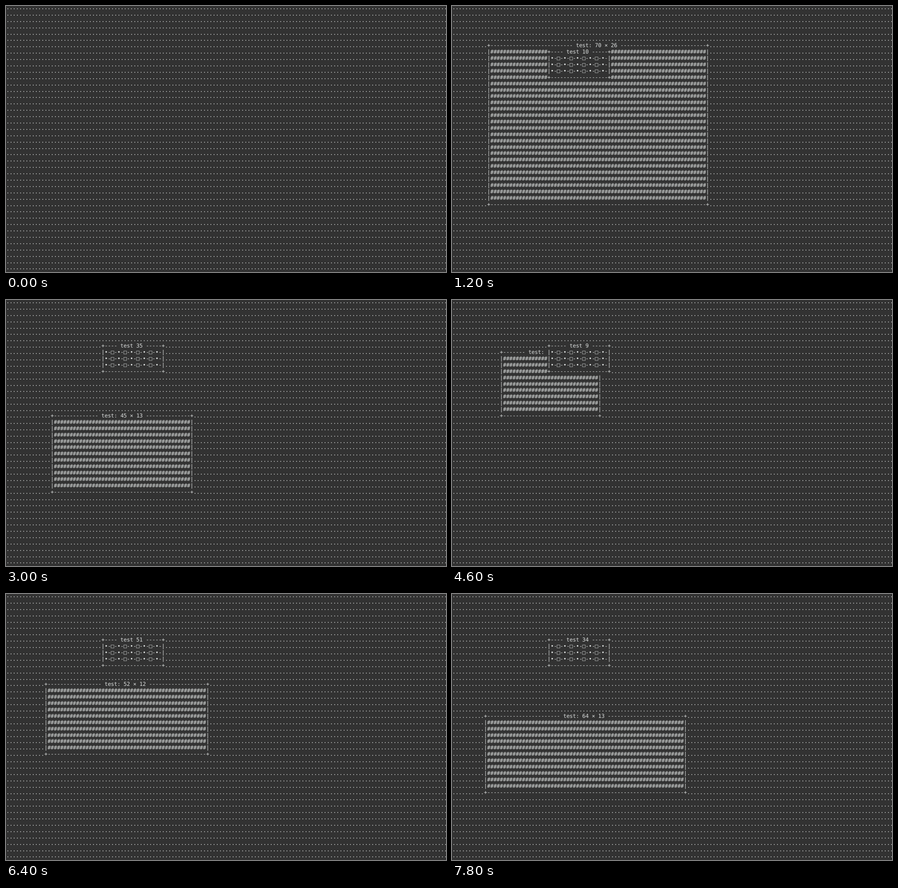
An HTML page without scripts that plays this animation: 962x582 px, repeating every 8 s.

```html
<!DOCTYPE html>
<html lang="en">
<head>
<meta charset="utf-8">
<title>Text windows</title>
<style>
/* Whole character cells: integers round while they are interpolated */
@property --on { syntax: "<integer>"; inherits: true; initial-value: 0; }
@property --named { syntax: "<integer>"; inherits: true; initial-value: 0; }
@property --l { syntax: "<integer>"; inherits: true; initial-value: 10; }
@property --t { syntax: "<integer>"; inherits: true; initial-value: 3; }
@property --r { syntax: "<integer>"; inherits: true; initial-value: 88; }
@property --b { syntax: "<integer>"; inherits: true; initial-value: 32; }
@property --w { syntax: "<integer>"; inherits: true; initial-value: 1; }
@property --h { syntax: "<integer>"; inherits: true; initial-value: 1; }
@property --n { syntax: "<integer>"; inherits: true; initial-value: 1; }
@property --pad { syntax: "<integer>"; inherits: false; initial-value: 0; }

html, body {
  margin: 0;
  width: 100%;
  height: 100%;
  overflow: hidden;
  background: #323232;
}
body { position: relative; }

.grid {
  --cw: 7px;
  --ch: 14px;

  /* long runs built from short strings */
  --dot: "...................................";
  --dots: var(--dot) var(--dot) var(--dot) var(--dot) "\A";
  --dots7: var(--dots) var(--dots) var(--dots) var(--dots) var(--dots) var(--dots) var(--dots);
  --hash: "########################################";
  --hashes: var(--hash) var(--hash) "\A";
  --hashes8: var(--hashes) var(--hashes) var(--hashes) var(--hashes) var(--hashes) var(--hashes) var(--hashes) var(--hashes);
  --dash: "----------------------------------------";
  --pipes: "|\A|\A|\A|\A|\A|\A|\A|\A";

  position: absolute;
  left: 0;
  top: 0;
  width: 980px;
  height: 588px;
  /* the hair of rotation keeps baselines from snapping to whole pixels */
  transform: translate(.45px, -3.96px) rotate(.001deg) scale(.9909, .9921);
  transform-origin: 0 0;
  font: 12px/14px "DejaVu Sans Mono", monospace;
  letter-spacing: calc(7px - .60205em);
  text-rendering: geometricPrecision;
  white-space: pre;
  color: #dcdfde;
  animation: 8s steps(1) -4ms infinite;
  animation-name: show, rename, left, top, right, bottom, count;
}

.dots::before {
  content: var(--dots7) var(--dots7) var(--dots7) var(--dots7) var(--dots7) var(--dots7);
}

.win {
  position: absolute;
  left: calc(var(--l) * var(--cw));
  top: calc(var(--t) * var(--ch));
  width: calc(var(--w) * var(--cw));
  height: calc(var(--h) * var(--ch));
  background: #323232;
  opacity: var(--on);
}
.big {
  --w: calc(var(--r) - var(--l) + 1);
  --h: calc(var(--b) - var(--t) + 1);
}
.small { --l: 30; --t: 7; --w: 20; --h: 5; }

/* Each strip is: cap, stretching middle, cap */
.strip {
  position: absolute;
  left: 0;
  right: 0;
  display: flex;
  overflow: hidden;
}
.strip span { flex: 1; min-width: 0; overflow: hidden; }
.edge { height: var(--ch); }
.edge::before, .edge::after { content: "+"; }
.edge span::before { content: var(--dash) var(--dash); }
.low { bottom: 0; }
.body { top: var(--ch); bottom: var(--ch); }
.body::before, .body::after { content: var(--pipes) var(--pipes) var(--pipes) var(--pipes); }
.hashes::before { content: var(--hashes8) var(--hashes8) var(--hashes8) var(--hashes8); }

.title {
  --pad: calc((var(--w) - 2 - var(--len)) / 2 - .25);
  position: absolute;
  top: 0;
  left: calc((var(--pad) + 1) * var(--cw));
  height: var(--ch);
  background: #323232;
}
.name { --len: 6; opacity: var(--named); }
.size { --len: 15; opacity: calc(1 - var(--named)); }
.size::before {
  counter-reset: w var(--w) h var(--h);
  content: " test: " counter(w) " × " counter(h) " ";
}
.tally { left: auto; right: calc(6 * var(--cw)); }
.tally::before {
  counter-reset: n var(--n);
  content: " test " counter(n) " ";
}

@keyframes show {
  0% { --on: 0; }
  2.5%, 100% { --on: 1; }
}
@keyframes rename {
  0% { --named: 1; }
  5%, 100% { --named: 0; }
}
@keyframes left {
  0% { --l: 10; }
  2.5% { --l: 10; animation-timing-function: steps(5); }
  15% { --l: 11; animation-timing-function: steps(6); }
  30% { --l: 13; animation-timing-function: steps(5); }
  42.5% { --l: 15; }
  45% { --l: 16; }
  55% { --l: 15; }
  65% { --l: 15; animation-timing-function: steps(6); }
  80% { --l: 12; animation-timing-function: steps(5); }
  92.5% { --l: 9; }
  97.5%, 100% { --l: 10; }
}
@keyframes top {
  0% { --t: 3; }
  2.5% { --t: 3; animation-timing-function: steps(5); }
  15% { --t: 6; animation-timing-function: steps(3); }
  22.5% { --t: 10; animation-timing-function: steps(8); }
  42.5% { --t: 20; animation-timing-function: steps(2); }
  47.5% { --t: 22; }
  50% { --t: 22; animation-timing-function: steps(4); }
  60% { --t: 3; }
  62.5% { --t: 1; }
  65% { --t: 5; animation-timing-function: steps(6); }
  80% { --t: 14; animation-timing-function: steps(2); }
  85% { --t: 16; animation-timing-function: steps(3); }
  92.5% { --t: 20; }
  97.5%, 100% { --t: 19; }
}
@keyframes right {
  0% { --r: 88; }
  2.5% { --r: 88; animation-timing-function: steps(5); }
  15% { --r: 80; animation-timing-function: steps(3); }
  22.5% { --r: 74; animation-timing-function: steps(3); }
  30% { --r: 67; animation-timing-function: steps(5); }
  42.5% { --r: 52; }
  45% { --r: 51; }
  47.5% { --r: 46; }
  65% { --r: 46; animation-timing-function: steps(6); }
  80% { --r: 63; animation-timing-function: steps(2); }
  85% { --r: 67; animation-timing-function: steps(3); }
  92.5% { --r: 75; }
  95% { --r: 74; }
  97.5%, 100% { --r: 73; }
}
@keyframes bottom {
  0% { --b: 32; }
  2.5% { --b: 32; animation-timing-function: steps(5); }
  15% { --b: 31; }
  30% { --b: 31; animation-timing-function: steps(5); }
  42.5% { --b: 30; }
  50% { --b: 30; animation-timing-function: steps(4); }
  60% { --b: 14; }
  62.5% { --b: 12; }
  65% { --b: 16; animation-timing-function: steps(6); }
  80% { --b: 25; animation-timing-function: steps(2); }
  85% { --b: 27; animation-timing-function: steps(3); }
  92.5% { --b: 32; }
  97.5%, 100% { --b: 31; }
}
/* counts up and wraps at sixty */
@keyframes count {
  0% { --n: 1; }
  2.5% { --n: 1; animation-timing-function: steps(8); }
  22.5% { --n: 16; animation-timing-function: steps(8); }
  42.5% { --n: 41; }
  45% { --n: 44; }
  47.5% { --n: 50; }
  52.5% { --n: 56; }
  55% { --n: 2; animation-timing-function: steps(4); }
  65% { --n: 31; animation-timing-function: steps(8); }
  85% { --n: 57; }
  87.5% { --n: 4; animation-timing-function: steps(4); }
  97.5%, 100% { --n: 34; }
}
</style>
</head>
<body>
<div class="grid"><div class="dots"></div><div class="win big"><div class="strip edge"><span></span></div><div class="strip body"><span class="hashes"></span></div><div class="strip edge low"><span></span></div><div class="title name"> test </div><div class="title size"></div></div><div class="win small"><div class="strip edge"><span></span></div><div class="strip body"><span>•-□-•-□-•-□-•-□-•-
•-□-•-□-•-□-•-□-•-
•-□-•-□-•-□-•-□-•-</span></div><div class="strip edge low"><span></span></div><div class="title tally"></div></div></div>
</body>
</html>
```
